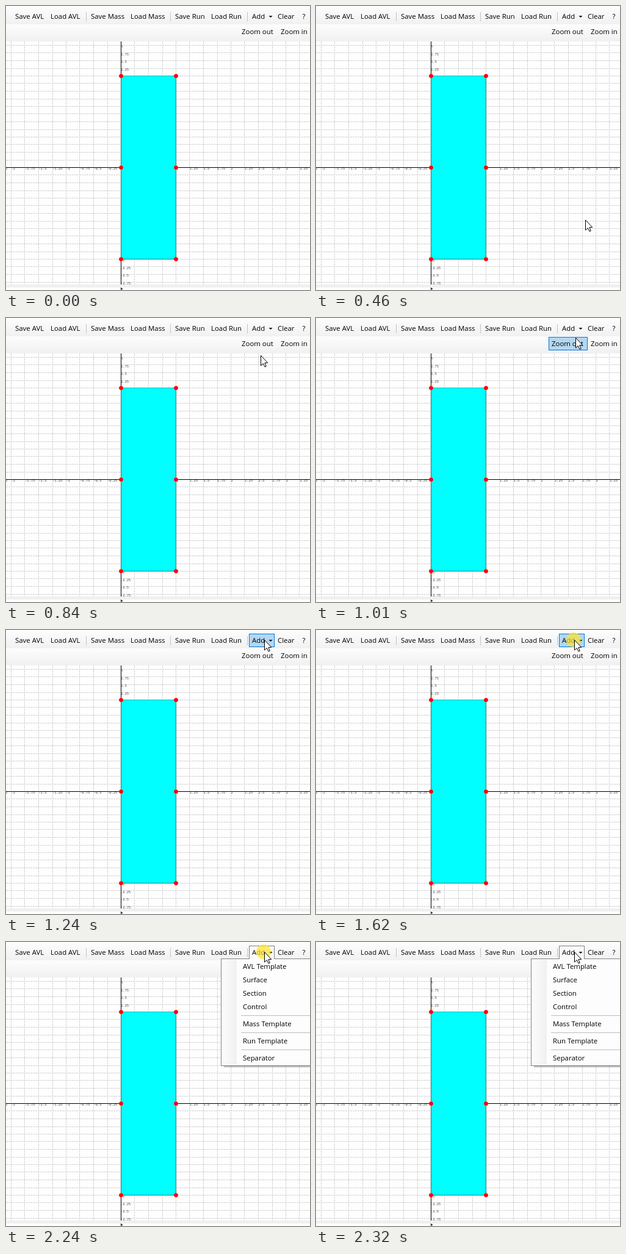
An HTML page with a canvas that plays this animation: 498 px wide and 465 px high, repeating every 4.25 s.

```html
<!DOCTYPE html>
<html lang="en">
<head>
<meta charset="utf-8">
<title>Add menu</title>
<style>
html, body { margin: 0; width: 100%; height: 100%; overflow: hidden; background: #fff; }
canvas { display: block; }
</style>
</head>
<body>
<canvas id="stage" width="498" height="465"></canvas>
<script>
const W = 498, H = 465, LOOP = 4250;
const ctx = document.getElementById('stage').getContext('2d');
const UI_FONT = '500 11.4px "Open Sans", sans-serif';
const TICK_FONT = '5.4px "Liberation Mono", monospace';
const ORIGIN = { x: 188, y: 264 };
const STEP = { x: 22.5, y: 12.5 };
const ADD = [398, 6, 42, 22], ZOOM_OUT = [381, 31, 64, 22];

// Pointer keyframes: time, x, y. Each position is held until the next.
const POINTER = [
  [380, 449, 447], [460, 441, 350], [540, 428, 230], [610, 418, 160],
  [690, 412, 113], [770, 414, 83], [840, 417, 61], [920, 422, 42],
  [1010, 425, 32], [1070, 424, 24], [1160, 423, 18], [1240, 423, 16]
];
const CLICKS = [[1620, 1760], [2240, 2320]];
const MENU_OPENS = 2240;

const TOOLBAR = [
  ['Save AVL', 15], ['Load AVL', 73], ['Save Mass', 139], ['Load Mass', 204],
  ['Save Run', 277], ['Load Run', 336], ['Add', 403], ['Clear', 445], ['?', 485.5]
];
const MENU = [
  ['AVL Template', 44], ['Surface', 66], ['Section', 88], ['Control', 110],
  ['Mass Template', 138], ['Run Template', 166], ['Separator', 194]
];

function fill(color, x, y, w, h) {
  ctx.fillStyle = color;
  ctx.fillRect(x, y, w, h);
}

function outline(color, x, y, w, h) {
  ctx.strokeStyle = color;
  ctx.strokeRect(x + .5, y + .5, w - 1, h - 1);
}

function gradient(x0, y0, x1, y1, from, to) {
  const g = ctx.createLinearGradient(x0, y0, x1, y1);
  g.addColorStop(0, from);
  g.addColorStop(1, to);
  return g;
}

function text(label, x, y, font = UI_FONT, color = '#000') {
  ctx.font = font;
  ctx.fillStyle = color;
  ctx.fillText(label, x, y);
}

function polygon(points) {
  ctx.beginPath();
  points.forEach(([x, y]) => ctx.lineTo(x, y));
  ctx.closePath();
}

function disc(color, x, y, r) {
  ctx.fillStyle = color;
  ctx.beginPath();
  ctx.arc(x, y, r, 0, Math.PI * 2);
  ctx.fill();
}

function gridLine(x0, y0, x1, y1) {
  ctx.beginPath();
  ctx.moveTo(x0, y0);
  ctx.lineTo(x1, y1);
  ctx.stroke();
}

// Grid positions fall on whole or half pixels; halves go to the even pixel.
const roundHalfEven = v => v % 1 ? 2 * Math.round(v / 2) : v;

function drawPlot() {
  fill('#fefefe', 0, 58, W, 398);
  ctx.save();
  ctx.beginPath();
  ctx.rect(0, 58, W, 398);
  ctx.clip();
  ctx.strokeStyle = '#d0d0d0';
  ctx.setLineDash([3, 1]);
  for (let i = -9; i <= 13; i++) {
    const x = roundHalfEven(ORIGIN.x + i * STEP.x) + .5;
    gridLine(x, 58, x, 456);
  }
  for (let i = -16; i <= 16; i++) {
    const y = roundHalfEven(ORIGIN.y + i * STEP.y) + .5;
    gridLine(0, y, W, y);
  }
  ctx.setLineDash([]);
  for (let i = -9; i <= 13; i++) {
    if (i) text(String(i / 4), ORIGIN.x + i * STEP.x + .6, ORIGIN.y + 4, TICK_FONT, '#444');
  }
  for (let i = -16; i <= 16; i++) {
    if (i) text(String(i / 4), ORIGIN.x, ORIGIN.y - i * STEP.y + 4, TICK_FONT, '#444');
  }
  fill('#000', 0, ORIGIN.y, W, 1);
  fill('#000', ORIGIN.x, 58, 1, 398);
  ctx.restore();

  fill('#0ff', 188, 114, 91, 301);
  outline('#008080', 188, 114, 91, 301);
  fill('#00b8b8', 189, 114, 89, 1);
  for (const y of [114.5, 264.5, 414.5]) {
    disc('#f00', 188.5, y, 3.35);
    disc('#f00', 278.5, y, 3.35);
  }

  fill('#f0f0f0', 0, 456, W, 5);
  fill('#fff', 0, 461, W, 4);
  fill('#301020', 188, 461, 1, 4);
  fill('#604050', 189, 462, 2, 2);
}

function drawToolbar(open, pointer) {
  fill(gradient(0, 0, 0, 30, '#fdfdfd', '#f1f1f1'), 0, 0, W, 30);
  fill(gradient(0, 30, 0, 58, '#fdfdfd', '#f0f0f0'), 0, 30, W, 28);
  for (const x of [131, 269, 395]) fill('#bdc3c9', x, 10, 1, 15);

  if (open) {
    fill('#fafafa', ...ADD);
    outline('#808080', ...ADD);
  } else if (pointer) {
    for (const [x, y, w, h] of [ADD, ZOOM_OUT]) {
      const [, px, py] = pointer;
      if (px >= x && px < x + w && py >= y && py < y + h) {
        fill('#b3d7f3', x, y, w, h);
        outline('#0078d7', x, y, w, h);
      }
    }
  }
  for (const [label, x] of TOOLBAR) text(label, x, 21);
  text('Zoom out', 386, 46);
  text('Zoom in', 450, 46);
  ctx.fillStyle = '#000';
  polygon([[430.5, 16], [436.5, 16], [433.5, 19]]);
  ctx.fill();
}

function drawMenu() {
  for (let i = 0; i < 3; i++) fill(`rgba(0,0,0,${.28 - i * .09})`, 357, 203 + i, W - 357, 1);
  fill('#fdfdfd', 352, 27, W - 352, 176);
  fill(gradient(353, 0, 378, 0, '#fcfcfc', '#f0f0f0'), 354, 29, 24, 172);
  outline('#808080', 352, 27, W - 350, 176);
  fill('#fafafa', 399, 27, 40, 1);
  for (const y of [120, 148, 176]) fill('#bdbdbd', 385, y, W - 385, 1);
  for (const [label, y] of MENU) text(label, 388, y);
}

function drawPointer([, x, y]) {
  ctx.save();
  ctx.translate(x + .5, y + .5);
  polygon([[0, 0], [0, 16.5], [3.8, 13], [6.5, 18.6], [8.8, 17.6], [6.3, 12.2], [11.2, 11.8]]);
  ctx.fillStyle = '#fff';
  ctx.fill();
  ctx.strokeStyle = '#000';
  ctx.stroke();
  ctx.restore();
}

function draw(t) {
  const pointer = POINTER.filter(([time]) => time <= t).pop();
  const open = t >= MENU_OPENS;
  ctx.lineWidth = 1;
  drawPlot();
  drawToolbar(open, pointer);
  if (open) drawMenu();
  if (CLICKS.some(([from, to]) => t >= from && t < to)) disc('rgba(255,228,40,.7)', 422, 16, 12);
  if (pointer) drawPointer(pointer);
}

const start = performance.now();
function tick() {
  draw((performance.now() - start) % LOOP);
  requestAnimationFrame(tick);
}
tick();
</script>
</body>
</html>
```
